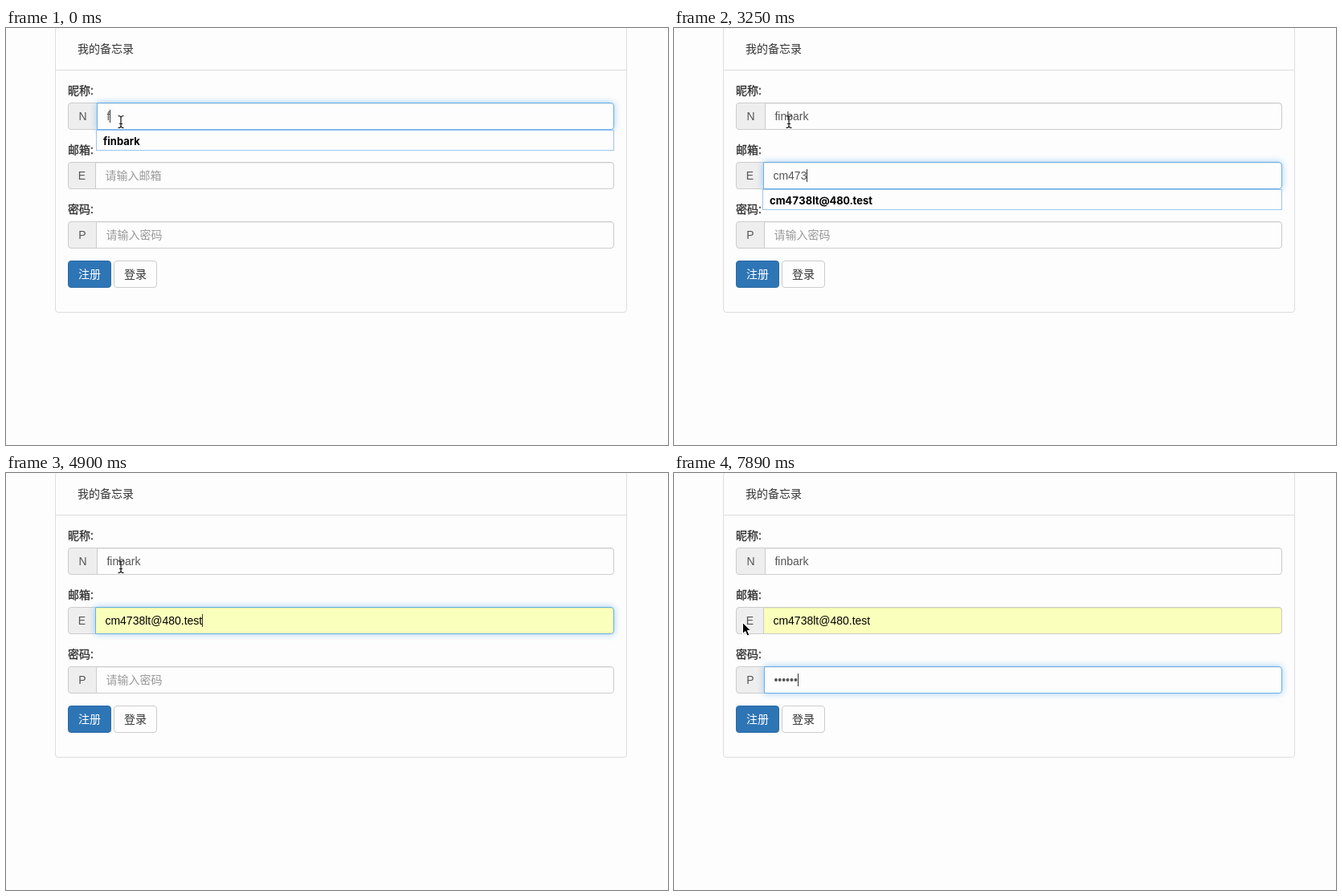
Recreate the animation shown at these times as an HTML page. Size 824 by 520 pixels, loop 8000 ms.

```html
<!DOCTYPE html>
<html lang="zh-CN">
<head>
<meta charset="utf-8">
<style>
html, body { margin: 0; width: 100%; height: 100%; overflow: hidden; background: #fdfdfd; }
body { position: relative; font: 14px "Liberation Sans", "Noto Sans CJK SC", "Noto Sans CJK", sans-serif; color: #333; }
div, svg { position: absolute; box-sizing: border-box; white-space: pre; }
.panel { left: 61px; top: -2px; width: 712px; height: 357px; border: 1px solid #ddd; border-radius: 4px; }
.head { left: 61px; top: 0; width: 712px; height: 53px; border-bottom: 1px solid #ddd; padding-left: 28px; line-height: 52px; }
.label { left: 77px; line-height: 20px; -webkit-text-stroke: .35px #333; }
.addon { left: 77px; height: 34px; border: 1px solid #ccc; border-radius: 4px 0 0 4px; background: #eee; color: #555; text-align: center; line-height: 32px; }
.input { height: 34px; border: 1px solid #ccc; border-radius: 0 4px 4px 0; padding-left: 11.4px; line-height: 32px; color: #555; }
.hint { color: #999; }
.caret { display: inline-block; width: 1px; height: 16px; margin-right: -1px; background: #333; vertical-align: -3px; }
.picked { background: #acd3ee; }
.popup { height: 26px; border: 1px solid #9fc4ec; padding-left: 8px; line-height: 26px; font: bold 13px/26px Inter, sans-serif; font-feature-settings: "tnum"; color: #000; }
.btn { top: 290px; width: 54px; height: 34px; border: 1px solid #ccc; border-radius: 4px; text-align: center; line-height: 32px; }
.main { left: 77px; background: #2e75b5; border-color: #2a6ba6; color: #fff; }
</style>
</head>
<body>
<div class="panel"></div>
<div class="head">我的备忘录</div>
<div class="btn main">注册</div>
<div class="btn" style="left:134px">登录</div>
<script>
const NAME = "finbark", USER = "cm4738lt", HOST = "@480.test";

function add(cls, x, y, w, text = "") {
  const el = document.createElement("div");
  el.className = cls;
  el.style.cssText = `left:${x}px;top:${y}px;` + (w ? `width:${w}px` : "");
  el.textContent = text;
  document.body.append(el);
  return el;
}

function field(label, letter, hint, x, y) {
  add("label", 77, y - 25, 0, label + ":");
  add("addon", 77, y, x - 76, letter);
  return { hint, box: add("input", x, y, 757 - x) };
}

const nick = field("昵称", "N", "请输入昵称", 113, 93);
const mail = field("邮箱", "E", "请输入邮箱", 111, 167);
const pass = field("密码", "P", "请输入密码", 112, 241);
const nickPopup = add("popup", 112, 127, 645, NAME);
const mailPopup = add("popup", 110, 201, 647, USER + HOST);

document.body.insertAdjacentHTML("beforeend", `
<svg id="beam" style="left:137px;top:108px" width="13" height="18" fill="none" stroke="#111" stroke-width="1.2">
  <path d="M2.5 1.5Q6 1.5 6 4Q6 1.5 9.5 1.5M6 4V14M2.5 16.5Q6 16.5 6 14Q6 16.5 9.5 16.5M4 11.5H8"/></svg>
<svg id="arrow" width="14" height="21">
  <path d="M1.5 1.5V15.5L4.8 12.5L7.2 18L9.8 17L7.4 11.5H11.7Z" fill="#000" stroke="#fff"/></svg>`);

// How many of the given moments have passed.
const passed = (t, times) => times.filter(m => t >= m).length;
const mix = (a, b, k) => Math.round(a + (b - a) * k);

function show({ hint, box }, text, caret, focus, picked = "") {
  const bar = caret ? '<span class="caret"></span>' : "";
  const html = text ? text + `<span class="picked">${picked}</span>` + bar
                    : bar + `<span class="hint">${hint}</span>`;
  if (box.innerHTML !== html) box.innerHTML = html;
  box.style.borderColor = `rgb(${mix(204, 102, focus)},${mix(204, 175, focus)},${mix(204, 233, focus)})`;
  box.style.boxShadow = `inset 0 1px 1px rgba(0,0,0,.075), 0 0 ${8 * focus}px rgba(102,175,233,${.6 * focus})`;
}

function draw(t) {
  const nickLen = 1 + passed(t, [150, 450, 600, 750, 1050, 1200]);
  show(nick, NAME.slice(0, nickLen), t < 1490, t < 1490 ? 1 : t < 1640 ? .6 : 0);

  const mailLen = passed(t, [2390, 2510, 2950, 3250, 3250, 3400, 3550, 3850]);
  const filled = t >= 4600, done = t >= 4900;
  const mailCaret = t >= 1490 && t < 2090 || t >= 2390 && t < 4450 || done && t < 5350;
  const mailFocus = t < 1490 || t >= 5350 ? 0 : t < 1640 ? .5 : 1;
  show(mail, USER.slice(0, mailLen) + (done ? HOST : ""), mailCaret, mailFocus, filled && !done ? HOST : "");
  mail.box.style.background = filled ? "#faffbb" : "";
  mail.box.style.color = filled ? "#000" : "";

  const dots = passed(t, [5940, 6240, 6540, 6990, 7140, 7440]);
  show(pass, "•".repeat(dots), t >= 5350, t < 5350 ? 0 : t < 5500 ? .9 : 1);

  nickPopup.hidden = t >= 1490;
  mailPopup.hidden = t < 2240 || done;
  mailPopup.style.background = filled ? "#b0d5fe" : "#fdfdfd";
  nickPopup.style.background = "#fdfdfd";

  beam.style.display = t < 7740 ? "" : "none";
  arrow.style.display = t < 7740 ? "none" : "";
  arrow.style.left = (t < 7890 ? 116 : 84) + "px";
  arrow.style.top = (t < 7890 ? 144 : 185) + "px";
}

const start = performance.now();
function tick(now) {
  draw(Math.max(0, now - start) % 8000);
  requestAnimationFrame(tick);
}
draw(0);
requestAnimationFrame(tick);
</script>
</body>
</html>
```
